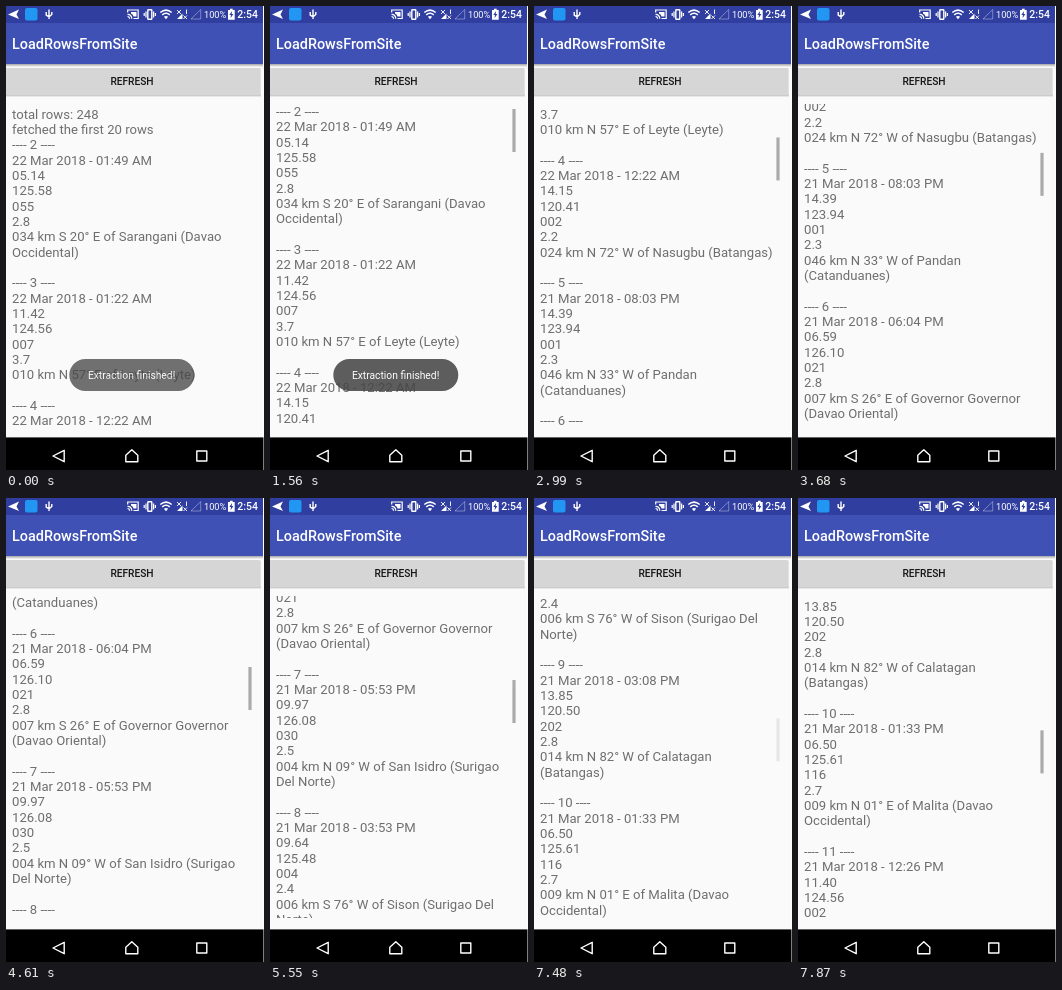
Animation of 258 by 464 pixels, one loop 8 s. Source, as an HTML page:

```html
<!DOCTYPE html>
<html lang="en">
<head>
<meta charset="utf-8">
<title>Scrolling list</title>
<style>
  html, body { margin: 0; width: 100%; height: 100%; overflow: hidden; background: #fafafa; }
  svg { display: block; width: 258px; height: 464px; font-family: Roboto, "Open Sans", sans-serif; }
  .line { fill: none; stroke: #fff; }
  .icon { fill: #fff; }
  .medium { font-weight: 500; }
</style>
</head>
<body>
<svg viewBox="0 0 258 464">
  <defs>
    <clipPath id="view"><rect y="98" width="258" height="322"/></clipPath>
    <linearGradient id="shade" x2="0" y2="1">
      <stop stop-color="#000" stop-opacity=".35"/>
      <stop offset="1" stop-color="#000" stop-opacity="0"/>
    </linearGradient>
  </defs>
  <rect width="258" height="464" fill="#fafafa"/>

  <!-- list -->
  <g clip-path="url(#view)">
    <text id="list" font-size="13.14" fill="#6e6e6e"></text>
  </g>
  <rect id="bar" x="242.4" width="3.2" height="43" fill="#ababab"/>

  <!-- app bar and button -->
  <rect width="257" height="17.5" fill="#303f9f"/>
  <rect y="17" width="257" height="41" fill="#3f51b5"/>
  <rect y="58" width="257" height="3" fill="url(#shade)"/>
  <text class="icon medium" x="6" y="42.7" font-size="14.4">LoadRowsFromSite</text>
  <rect x="-3" y="88" width="258" height="3.2" rx="1.5" fill="url(#shade)"/>
  <rect x="-3" y="62" width="257.7" height="27" rx="1.5" fill="#d6d6d6"/>
  <text class="medium" x="126" y="79.2" font-size="10.2" text-anchor="middle" fill="#161616">REFRESH</text>

  <!-- status bar -->
  <path class="icon" d="M2 8.5 13 3.5 10.5 8.5 13 13Z"/>
  <rect x="19" y="2" width="12.5" height="12.5" rx="2" fill="#2196f3"/>
  <g class="line" stroke-width="1.2">
    <path d="M43 3.5V13M40.2 6V9L43 10.8 45.8 8.5V6" stroke-width="1.4"/>
    <path d="M121.7 6.5V4H132.2V12.5H127.5M121.5 8.3Q125.6 8.3 125.8 12.8M121.5 10.5Q123.5 10.6 123.6 12.8"/>
    <path d="M138.2 7V10M140 5.5V11.5M149.4 7V10M147.6 5.5V11.5"/>
    <rect x="141.8" y="3.7" width="4" height="9.6" rx=".6" stroke-width="1.4"/>
    <path d="M154.3 6.5Q160 1.8 165.7 6.5M156.2 8.8Q160 5.8 163.8 8.8" stroke-width="1.5"/>
    <path d="M171 4 175 8M175 4 171 8M177.5 9.5 181 13M181 9.5 177.5 13M180.5 3.5V8" stroke-width=".9"/>
    <path d="M185 13H194.7V3.5Z" stroke-width=".8" opacity=".45"/>
  </g>
  <path class="icon" d="M125 6H130.5V10.5H127.5Q127 8 125 7.5ZM157.9 10.8Q160 9.2 162.1 10.8L160 13.3ZM171 13 176.5 7.5V13ZM222 4H224V2.8H226.7V4H228.7V13.7H222Z"/>
  <path d="M226 5 223.3 9H225L224.5 12.3 227.4 8H225.7Z" fill="#303f9f"/>
  <text class="icon" x="198" y="12" font-size="9.2">100%</text>
  <text class="icon medium" x="231.3" y="12.2" font-size="10.5">2:54</text>

  <!-- navigation bar -->
  <rect x="257" width="1" height="464" fill="#fdfdfd"/>
  <rect y="431.4" width="257.5" height="33" fill="#000"/>
  <g class="line" stroke-width="1.4" stroke-linejoin="round">
    <path d="M58.2 444.3V455.7L47 450Z"/>
    <path d="M119.8 449.3 125.8 443.8 131.8 449.3V455.7H119.8Z"/>
    <rect x="190.8" y="445" width="10" height="10"/>
  </g>

  <!-- toast -->
  <g id="toast">
    <rect x="63.3" y="353" width="125" height="32" rx="16" fill="#464646"/>
    <text class="icon" x="125.6" y="372.6" font-size="10.3" text-anchor="middle">Extraction finished!</text>
  </g>
</svg>
<script>
const LOOP = 8000, LINE = 46 / 3, TICK = 140;
const $ = id => document.getElementById(id);

// day - time | latitude | longitude | depth | magnitude | place, wrapped by hand
const records = `22 Mar 2018 - 01:49 AM|05.14|125.58|055|2.8|034 km S 20° E of Sarangani (Davao|Occidental)
22 Mar 2018 - 01:22 AM|11.42|124.56|007|3.7|010 km N 57° E of Leyte (Leyte)
22 Mar 2018 - 12:22 AM|14.15|120.41|002|2.2|024 km N 72° W of Nasugbu (Batangas)
21 Mar 2018 - 08:03 PM|14.39|123.94|001|2.3|046 km N 33° W of Pandan|(Catanduanes)
21 Mar 2018 - 06:04 PM|06.59|126.10|021|2.8|007 km S 26° E of Governor Governor|(Davao Oriental)
21 Mar 2018 - 05:53 PM|09.97|126.08|030|2.5|004 km N 09° W of San Isidro (Surigao|Del Norte)
21 Mar 2018 - 03:53 PM|09.64|125.48|004|2.4|006 km S 76° W of Sison (Surigao Del|Norte)
21 Mar 2018 - 03:08 PM|13.85|120.50|202|2.8|014 km N 82° W of Calatagan|(Batangas)
21 Mar 2018 - 01:33 PM|06.50|125.61|116|2.7|009 km N 01° E of Malita (Davao|Occidental)
21 Mar 2018 - 12:26 PM|11.40|124.56|002`.split("\n");

const lines = ["total rows: 248", "fetched the first 20 rows"];
records.forEach((r, i) => lines.push(`---- ${i + 2} ----`, ...r.split("|"), ""));
$("list").innerHTML = lines
  .map((s, i) => `<tspan x="6" y="${(112.7 + i * LINE).toFixed(2)}">${s}</tspan>`).join("");

// swipes: [first jump, last jump, offset reached]
const swipes = [
  [1560, 1980, 134], [2690, 2990, 245.3], [3430, 3680, 360], [3950, 4360, 462],
  [4610, 4740, 588], [5550, 5800, 690], [6350, 6480, 796], [6650, 6920, 907.5], [7750, 7870, 996.7]
];

// Each swipe moves in equal jumps, about one per tick.
function scrollAt(t) {
  let y = 0, idle = Infinity;
  for (const [start, end, to] of swipes) {
    if (t < start) break;
    const n = Math.round((end - start) / TICK);
    const k = Math.min(n, Math.floor((t - start) / (end - start) * n));
    y += (to - y) * (k + 1) / (n + 1);
    idle = t - end;
  }
  return { y, idle };
}

function draw() {
  const t = performance.now() % LOOP;
  const { y, idle } = scrollAt(t);
  $("list").setAttribute("transform", `translate(0 ${-y})`);
  $("bar").setAttribute("y", 98.5 + y * .1343);
  $("bar").setAttribute("opacity", idle < 500 ? 1 : idle < LOOP ? .25 : 0);
  $("toast").setAttribute("opacity", t < 150 ? .76 : t < 1980 ? .87 : t < 2260 ? .63 : 0);
  requestAnimationFrame(draw);
}
draw();
</script>
</body>
</html>
```
